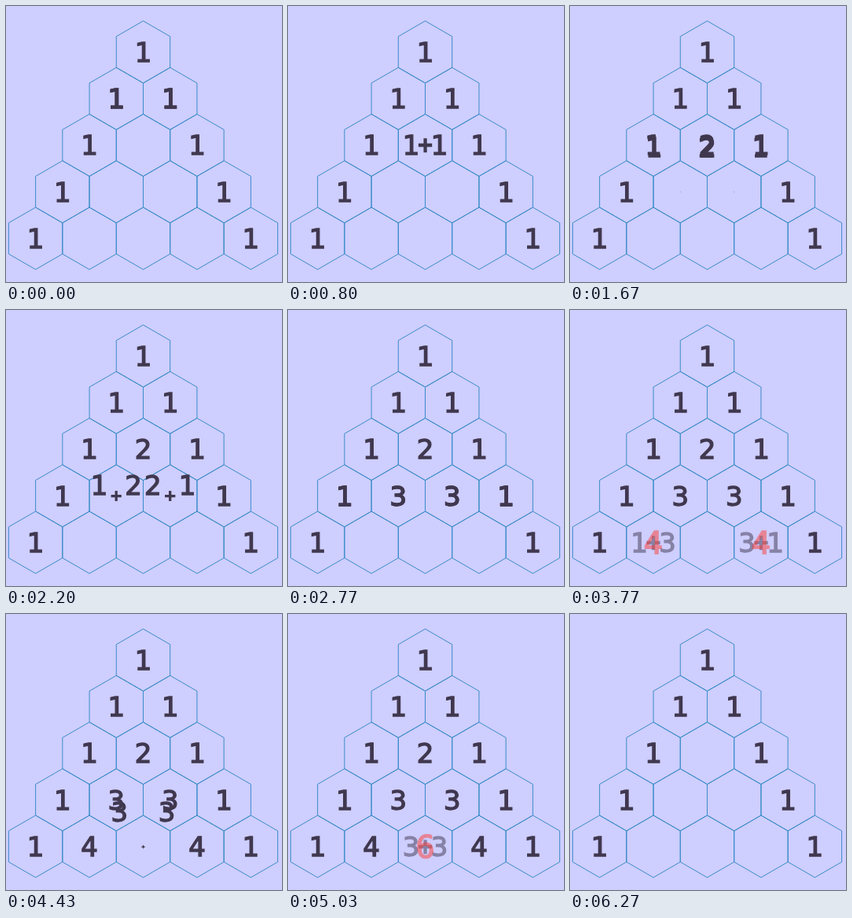
These frames come from a looping animation (351x351 px, 6.3 s). An HTML page:

```html
<!DOCTYPE html>
<html lang="en">
<head>
<meta charset="utf-8">
<title>Triangle of sums</title>
<style>
  html, body { margin: 0; width: 100%; height: 100%; overflow: hidden; background: #ceceff; }
  svg { display: block; width: 100vw; height: 100vh; }
  path { fill: none; stroke: #3a8cc8; stroke-width: 1; }
  text {
    font: 34px "DejaVu Sans", sans-serif;
    text-anchor: middle;
    color: #40384f;
    fill: currentColor;
    stroke: currentColor;
    stroke-width: 1.4px;
  }
  text.plus { font-size: 24px; stroke-width: 2.3px; }
</style>
</head>
<body>
<svg viewBox="0 0 351 351"></svg>
<script>
const svg = document.querySelector('svg');
const RADIUS = 39.5, WIDTH = 68.44, PITCH = 59.27;
const SPREAD = 18;                 // distance of each addend from the cell centre
const LOOP = 6300, FPS = 30;
const MOVE = 24;                   // all step times below are in ticks of 1/30 s
const RESET = { start: 180, length: 8 };
const INK = [64, 56, 79], RED = [255, 60, 50];

const steps = [
  { start: 0, fadeAt: 29, fade: 8, cells: [[2, 1, 1, 1]] },
  { start: 45, fadeAt: 72, fade: 10, cells: [[3, 1, 1, 2], [3, 2, 2, 1]] },
  { start: 83, fadeAt: 110, fade: 10, cells: [[4, 1, 1, 3], [4, 3, 3, 1]] },
  { start: 121, fadeAt: 148, fade: 10, cells: [[4, 2, 3, 3]] }
];

const clamp = v => Math.max(0, Math.min(1, v));
const mix = (a, b, p) => a + (b - a) * p;
const centre = (row, col) => ({
  x: 174.5 + (col - row / 2) * WIDTH,
  y: 58.5 + row * PITCH
});

function add(tag, attributes, content = '') {
  const node = document.createElementNS('http://www.w3.org/2000/svg', tag);
  for (const name in attributes) node.setAttribute(name, attributes[name]);
  node.textContent = content;
  return svg.appendChild(node);
}

const digit = value => add('text', { y: 12.4 }, value);

function place(node, x, y, scale = 1) {
  node.setAttribute('transform', `translate(${x} ${y}) scale(${scale})`);
}

function hexagon({ x, y }) {
  const points = Array.from({ length: 6 }, (_, i) => {
    const angle = (i + 0.5) * Math.PI / 3;
    return `${x + RADIUS * Math.cos(angle)} ${y + RADIUS * Math.sin(angle)}`;
  });
  add('path', { d: `M${points.join('L')}Z` });
}

for (let row = 0; row < 5; row++) {
  for (let col = 0; col <= row; col++) hexagon(centre(row, col));
}
for (let row = 0; row < 5; row++) {
  for (const col of new Set([0, row])) {
    const { x, y } = centre(row, col);
    place(digit(1), x, y);
  }
}

const sums = steps.flatMap(step => step.cells.map(([row, col, left, right]) => ({
  step,
  to: centre(row, col),
  fromLeft: centre(row - 1, col - 1),
  fromRight: centre(row - 1, col),
  left: digit(left),
  right: digit(right),
  plus: add('text', { class: 'plus', y: 8 }, '+'),
  result: digit(left + right)
})));

function drawSum(sum, tick) {
  const { step, to, fromLeft, fromRight, left, right, plus, result } = sum;
  const move = clamp((tick - step.start) / MOVE) ** 2;
  const fade = clamp((tick - step.fadeAt) / step.fade);
  const swap = clamp(fade / 0.6);
  const gone = clamp((tick - RESET.start) / RESET.length);

  const y = mix(fromLeft.y, to.y, move);
  place(left, mix(fromLeft.x, to.x - SPREAD, move), y);
  place(right, mix(fromRight.x, to.x + SPREAD, move), y);
  place(plus, to.x, to.y, move);
  for (const part of [left, right, plus]) {
    part.style.opacity = tick < step.start ? 0 : 1 - swap;
  }

  const pulse = 1 + 0.2 * Math.sin(Math.PI * fade) ** 2;
  const darken = clamp((fade - 0.4) / 0.6);
  place(result, to.x, to.y, pulse);
  result.style.color = `rgb(${RED.map((c, i) => Math.round(mix(c, INK[i], darken)))})`;
  result.style.opacity = swap * (1 - gone);
}

function draw() {
  const time = performance.now() % LOOP;
  const tick = Math.floor((time + 3.4) * FPS / 1000);
  for (const sum of sums) drawSum(sum, tick);
  requestAnimationFrame(draw);
}
draw();
</script>
</body>
</html>
```
